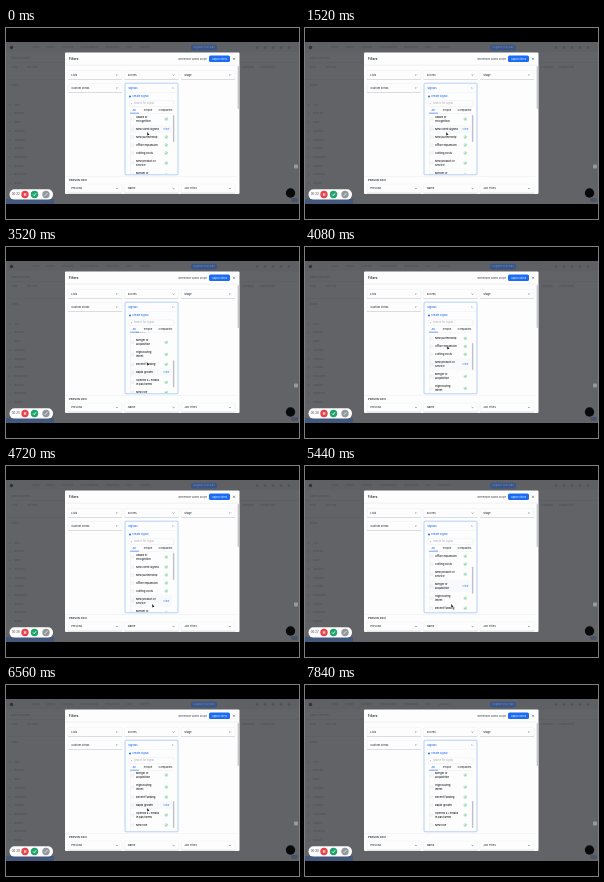
Animation, 293 px wide and 191 px high, one loop 7.92 s. Source, as an HTML page with a canvas:

```html
<!DOCTYPE html>
<html lang="en">
<head>
<meta charset="utf-8">
<title>Signal filters</title>
<style>
  html, body { margin: 0; width: 100%; height: 100%; overflow: hidden; background: #000; }
  canvas { display: block; width: 293px; height: 191px; }
</style>
</head>
<body>
<canvas id="stage" width="293" height="191"></canvas>
<script>
const ctx = document.getElementById('stage').getContext('2d');
const LOOP = 7920, STEP = 80, HOVER_LAG = 160, MAX_SCROLL = 57;
const BLUE = '#1a6cf5', INK = '#32363d', DIM = '#4e5054', RULE = '#595b5e';
const LIST = { top: 85.5, bottom: 146 };

const signals = [
  'Award or|recognition', 'New client signed', 'New partnership', 'Office expansion',
  'Cutting costs', 'New product or|service', 'Merger or|acquisition', 'High buying|intent',
  'Recent funding', 'Rapid growth', 'Opened 2+ emails|in past week', 'New role'
];
let nextTop = 85;
const rows = signals.map(label => {
  const lines = label.split('|');
  const row = { lines, top: nextTop, height: lines.length * 4 + 4 };
  nextTop += row.height;
  return row;
});

const moves = [
  { from: 1520, to: 2480, x: 141, y: 130 },
  { from: 3040, to: 4080, x: 143, y: 101 },
  { from: 4160, to: 4720, x: 147, y: 140 },
  { from: 5440, to: 6400, x: 142, y: 125 },
  { from: 6900, to: 7120, x: 43, y: 166 }
];

function ease(t, from, to) {
  const p = Math.min(1, Math.max(0, (t - from) / (to - from)));
  return p * p * (3 - 2 * p);
}

function scrollAt(t) {
  return MAX_SCROLL * (ease(t, 1520, 2200) - ease(t, 3280, 4550) + ease(t, 5200, 5700));
}

function cursorAt(t) {
  return moves.reduce((pos, move) => {
    const p = ease(t, move.from, move.to);
    return { x: pos.x + (move.x - pos.x) * p, y: pos.y + (move.y - pos.y) * p };
  }, { x: 142, y: 106 });
}

// The highlight trails the pointer a little.
function hoveredAt(t) {
  const { x, y } = cursorAt(t - HOVER_LAG);
  if (x < 120 || y > LIST.bottom) return undefined;
  const tip = y - 2 + scrollAt(t - HOVER_LAG);
  return rows.find(row => tip >= row.top && tip < row.top + row.height);
}

function rect(x, y, w, h, fill) {
  ctx.fillStyle = fill;
  ctx.fillRect(x, y, w, h);
}

function round(x, y, w, h, r, fill, stroke) {
  ctx.beginPath();
  ctx.roundRect(x, y, w, h, r);
  if (fill) { ctx.fillStyle = fill; ctx.fill(); }
  if (stroke) { ctx.strokeStyle = stroke; ctx.lineWidth = 0.6; ctx.stroke(); }
}

function disc(x, y, r, fill) {
  round(x - r, y - r, r * 2, r * 2, r, fill);
}

function path(points, color, width = 0.6) {
  ctx.beginPath();
  points.forEach(([x, y]) => ctx.lineTo(x, y));
  ctx.strokeStyle = color;
  ctx.lineWidth = width;
  ctx.stroke();
}

// Text is set at ten times its size and scaled down to keep fractional spacing.
function text(str, x, y, color = INK, size = 2.7, weight = 500, align = 'left') {
  ctx.save();
  ctx.translate(x, y);
  ctx.scale(0.1, 0.1);
  ctx.font = `${weight} ${size * 10}px Inter, Roboto, sans-serif`;
  ctx.textAlign = align;
  ctx.textBaseline = 'middle';
  ctx.fillStyle = color;
  ctx.fillText(str, 0, 0);
  const width = ctx.measureText(str).width / 10;
  ctx.restore();
  return width;
}

function textRow(labels, x, y, gap) {
  labels.forEach(label => { x += text(label, x, y, DIM, 2.6) + gap; });
}

function chevron(x, y, color, up = 1) {
  path([[x - 0.8, y - 0.4 * up], [x, y + 0.4 * up], [x + 0.8, y - 0.4 * up]], color, 0.5);
}

function check(x, y, s, color) {
  path([[x - s, y], [x - s * 0.2, y + s * 0.8], [x + s, y - s * 0.8]], color, s * 0.6);
}

function drawPage() {
  rect(0, 0, 293, 191, '#000');
  rect(0, 14, 293, 162, '#626366');
  rect(0, 14, 293, 10, '#5e6063');
  disc(5.5, 19.5, 1.7, '#303235');
  textRow(['Home', 'Search', 'Contacts', 'Conversations', 'Sequences', 'Calls', 'Analytics'], 26, 19.5, 7);
  round(185, 16.8, 26, 5.6, 2, '#38568a');
  text('Upgrade your plan', 198, 19.6, '#7384a2', 2.4, 500, 'center');
  for (let x = 251; x < 290; x += 8) disc(x, 19.5, 1.2, DIM);

  text('Saved searches', 5, 30, DIM, 2.6);
  textRow(['Total', 'Net new'], 5, 39, 10);
  textRow(['Company', 'Contact info'], 236, 39, 6);
  text('Filters', 5, 57, DIM, 2.6);
  rect(0, 34, 293, 0.5, RULE);
  rect(0, 51, 59, 0.5, RULE);
  ['Lists', 'Persona', 'Name', 'Job titles', 'Company', 'Location', 'Employees', 'Industry',
    'Keywords', 'Signals'].forEach((label, i) => {
    const y = 77 + i * 8.7;
    text(label, 8, y, DIM, 2.5);
    rect(3, y - 0.8, 1.6, 1.6, RULE);
  });
  rect(0, 171, 48, 5, '#44587c');
  round(285, 170, 7, 4, 2, '#48536a');
  round(288, 136.5, 4, 4, 1, '#98999c');
  disc(284.5, 165, 4.7, '#08090b');
}

function fieldRow(labels, y) {
  labels.forEach((label, i) => {
    const x = 62 + i * 56.5;
    round(x, y - 4.5, 54, 9, 1, null, '#f0f1f3');
    rect(x, y + 4.3, 54, 0.6, '#c9ccd1');
    text(label, x + 3.2, y);
    chevron(x + 49, y, INK);
  });
}

function drawModal() {
  round(59, 24.5, 174.5, 141.5, 1, '#fdfdfd');
  text('Filters', 63, 30.8, INK, 3.1, 700);
  text('Remember saved scope', 201, 30.8, INK, 2.5, 400, 'right');
  round(203, 27.4, 21, 6.6, 1.6, BLUE);
  text('Apply Filters', 213.5, 30.8, '#e6effe', 2.5, 500, 'center');
  path([[227, 29.8], [229, 31.8]], INK, 0.5);
  path([[229, 29.8], [227, 31.8]], INK, 0.5);
  rect(59, 36.8, 174.5, 0.5, '#e0e2e5');
  round(231.6, 38, 1.6, 43, 0.8, '#c5c7ca');

  fieldRow(['Lists', 'Scores', 'Stage'], 47);
  fieldRow(['Custom Fields'], 60);
  rect(59, 148.2, 172, 0.4, '#e6e8eb');
  text('PERSON INFO', 63, 152, INK, 2.7, 600);
  fieldRow(['Persona', 'Name', 'Job Titles'], 160.5);
}

function drawRow(row, y, hovered) {
  if (hovered) rect(125, y, 41, row.height, '#f8f9fb');
  const mid = y + row.height / 2;
  round(125.5, mid - 1.2, 2.4, 2.4, 0.5, null, '#e3e5e8');
  const first = mid - (row.lines.length - 1) * 2;
  row.lines.forEach((line, i) => text(line, 130, first + i * 4, '#24282e', 2.65, 600));
  if (hovered) {
    text('View', 160.3, mid, '#4a86e8', 2.5, 500, 'center');
  } else {
    disc(160.3, mid, 1.9, '#cdeed9');
    check(160.3, mid, 0.9, '#4fb47a');
  }
}

function drawPanel(scroll, hovered) {
  round(119, 55.2, 53, 91.6, 1, '#fdfdfd', '#86b1f1');
  text('Signals', 122.2, 60, BLUE);
  chevron(167, 60, BLUE, -1);
  rect(119, 64.4, 53, 0.4, '#e3ecfa');
  disc(124, 68.6, 1, BLUE);
  text('Create signal', 126, 68.6, BLUE, 2.6);
  round(123, 72.8, 45, 5.8, 1, null, '#eceef1');
  disc(125.4, 75.7, 0.6, '#b4b8be');
  text('Search for signal', 128, 75.7, '#a0a5ac', 2.5, 400);
  text('All', 128.2, 82, BLUE, 2.6, 600, 'center');
  text('People', 142, 82, INK, 2.6, 500, 'center');
  text('Companies', 159.5, 82, INK, 2.6, 500, 'center');
  rect(123, 85, 45, 0.4, '#e6e8eb');
  rect(124, 84.8, 9, 0.6, BLUE);

  ctx.save();
  ctx.beginPath();
  ctx.rect(120, LIST.top, 51, LIST.bottom - LIST.top);
  ctx.clip();
  rows.forEach(row => drawRow(row, row.top - scroll, row === hovered));
  ctx.restore();
  rect(124, LIST.top, 0.4, LIST.bottom - LIST.top, '#e6e8eb');
  round(166.9, 87 + scroll * 0.51, 1.4, 27, 0.7, '#bcbfc3');
}

function drawRecorder(t) {
  round(3.5, 161.2, 43.5, 10.4, 5, '#fdfdfd');
  const seconds = 22 + Math.floor((t + 160) / 1000);
  text(`00:${seconds}`, 5.8, 166.5, '#5d5054', 2.8, 500);
  disc(19, 166.5, 3.7, '#e5434a');
  rect(17.9, 165.2, 0.8, 2.6, '#fff');
  rect(19.4, 165.2, 0.8, 2.6, '#fff');
  disc(28.5, 166.5, 3.7, '#1fa36b');
  check(28.5, 166.5, 1.5, '#fff');
  disc(40, 166.5, 3.7, '#92989b');
  path([[38.6, 168], [41.5, 165]], '#eef1f1', 0.8);
}

function drawCursor({ x, y }) {
  ctx.beginPath();
  [[-0.8, -2], [-0.8, 1.6], [0.1, 0.9], [1.5, 0.7]].forEach(([dx, dy]) => ctx.lineTo(x + dx, y + dy));
  ctx.closePath();
  ctx.strokeStyle = '#fff';
  ctx.lineWidth = 0.5;
  ctx.stroke();
  ctx.fillStyle = '#222';
  ctx.fill();
}

function draw(t) {
  drawPage();
  drawModal();
  drawPanel(scrollAt(t), hoveredAt(t));
  drawRecorder(t);
  if (t < 7680) drawCursor(cursorAt(t));
}

const start = performance.now();
function tick() {
  const t = (performance.now() - start) % LOOP;
  draw(Math.floor(t / STEP) * STEP);
  requestAnimationFrame(tick);
}
tick();
</script>
</body>
</html>
```
